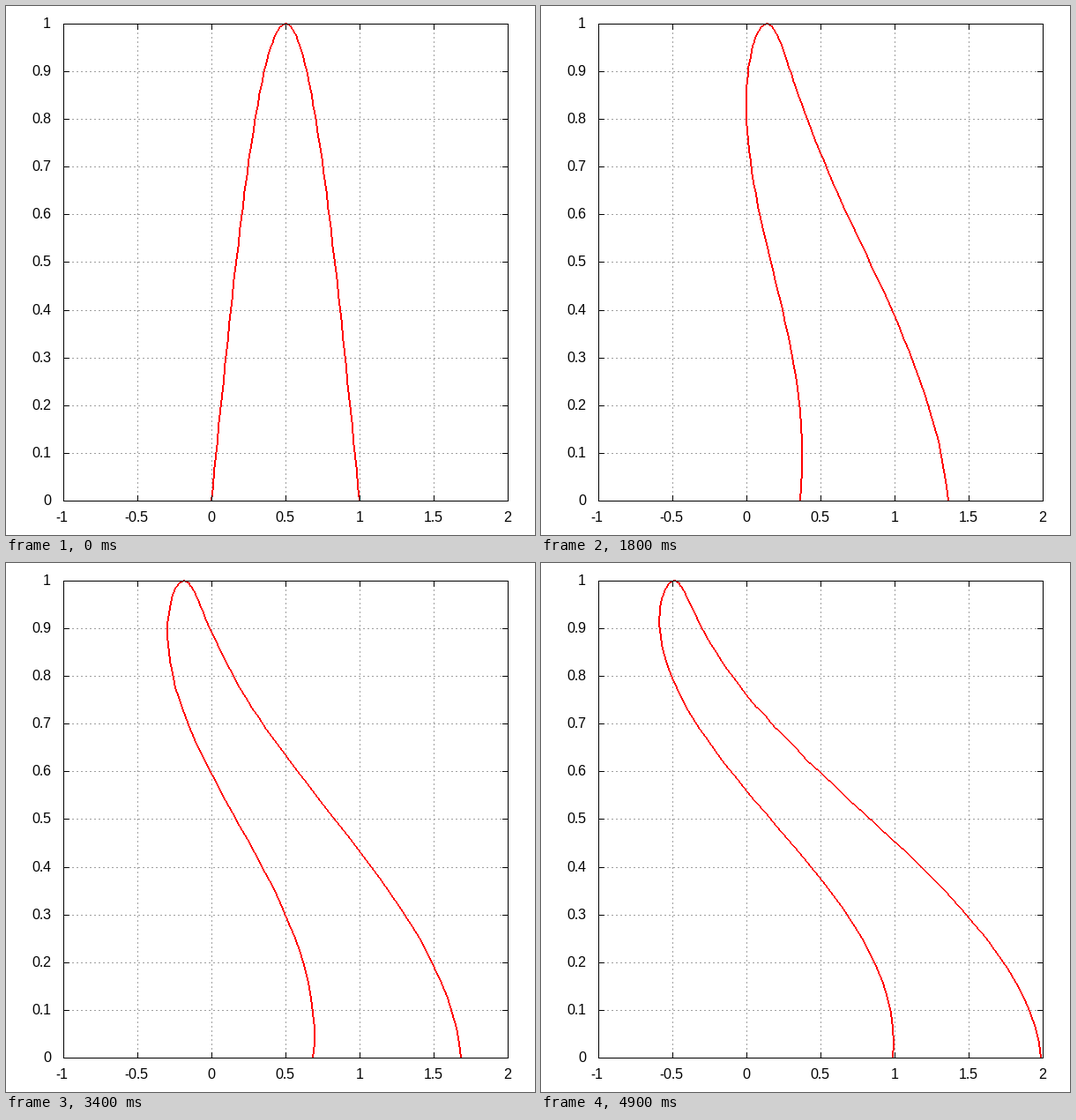
A matplotlib script that plays this animation: 600 px wide and 600 px high, repeating every 5 s.

```python
import matplotlib.pyplot as plt
import numpy as np
from matplotlib.animation import FuncAnimation

SIZE, DPI = 600, 100
FRAMES, INTERVAL = 50, 100
LEFT, RIGHT, TOP, BOTTOM = 65, 569, 20, 561
PX = 72 / DPI  # one pixel in points
TICK = 6

plt.rcParams["font.family"] = "Liberation Sans"
plt.rcParams["text.hinting"] = "native"
plt.rcParams["text.hinting_factor"] = 1

fig = plt.figure(figsize=(SIZE / DPI, SIZE / DPI), dpi=DPI, facecolor="white")
ax = fig.add_axes([0, 0, 1, 1])
ax.axis("off")


def px_x(x):
    return LEFT + np.floor((x + 1) / 3 * (RIGHT - LEFT) + 0.5)


def px_y(y):
    return BOTTOM - np.floor(y * (BOTTOM - TOP) + 0.5)


def stroke(xs, ys, color="black", zorder=3, **style):
    ax.plot(xs, ys, color=color, lw=PX, zorder=zorder, snap=False,
            solid_capstyle="butt", dash_capstyle="butt", **style)


def grid_line(xs, ys):
    stroke(xs, ys, color="#a0a0a0", zorder=1, linestyle=(0, (2, 3)))


def label(x, y, value, align):
    ax.text(x, y, f"{value:g}", fontsize=16 * PX, ha=align, va="baseline")


def draw_axes():
    for value in np.arange(-1, 2.1, 0.5):
        x = px_x(value) + 0.5
        if -1 < value < 2:
            grid_line([x, x], [TOP, BOTTOM])
        stroke([x, x], [BOTTOM - TICK, BOTTOM])
        stroke([x, x], [TOP, TOP + TICK + 1])
        label(x - (1.75 if value < 0 else 0.75), 585, value, "center")

    for tenth in range(11):
        y = px_y(tenth / 10) + 0.5
        if 0 < tenth < 10:
            grid_line([LEFT, RIGHT], [y, y])
        stroke([LEFT, LEFT + TICK + 1], [y, y])
        stroke([RIGHT - TICK, RIGHT], [y, y])
        label(51, y + 4.5, tenth / 10, "right")

    for x in (LEFT + 0.5, RIGHT + 0.5):
        stroke([x, x], [TOP, BOTTOM + 1])
    for y in (TOP + 0.5, BOTTOM + 0.5):
        stroke([LEFT, RIGHT + 1], [y, y])


def draw_polyline(mask, xs, ys):
    """Hard-edged two-pixel pen: doubled sideways on steep segments, upwards on flat ones."""
    for x0, y0, x1, y1 in zip(xs, ys, xs[1:], ys[1:]):
        run, rise = abs(x1 - x0), abs(y1 - y0)
        steps = int(max(run, rise)) + 1
        cols = np.floor(np.linspace(x0, x1, steps) + 0.5).astype(int)
        rows = np.floor(np.linspace(y0, y1, steps) + 0.5).astype(int)
        mask[rows, cols] = 1
        if run >= rise:
            mask[rows - 1, cols] = 1
        else:
            mask[rows, cols - 1] = 1


draw_axes()
layer = np.zeros((SIZE, SIZE, 4))
layer[..., 0] = 1
curve = ax.imshow(layer, extent=(0, SIZE, SIZE, 0), aspect="auto",
                  interpolation="nearest", zorder=2)
ax.set_xlim(0, SIZE)
ax.set_ylim(SIZE, 0)

s = np.linspace(0, 1, 100)
height = np.sin(np.pi * s)


def update(frame):
    time = 2 * frame / 99
    # each level travels at its own constant speed
    x = s + time * np.cos(np.pi * height)
    layer[..., 3] = 0
    draw_polyline(layer[..., 3], px_x(x), px_y(height))
    curve.set_data(layer)
    return (curve,)


anim = FuncAnimation(fig, update, frames=FRAMES, interval=INTERVAL, repeat=True,
                     repeat_delay=0)
plt.show()
```
